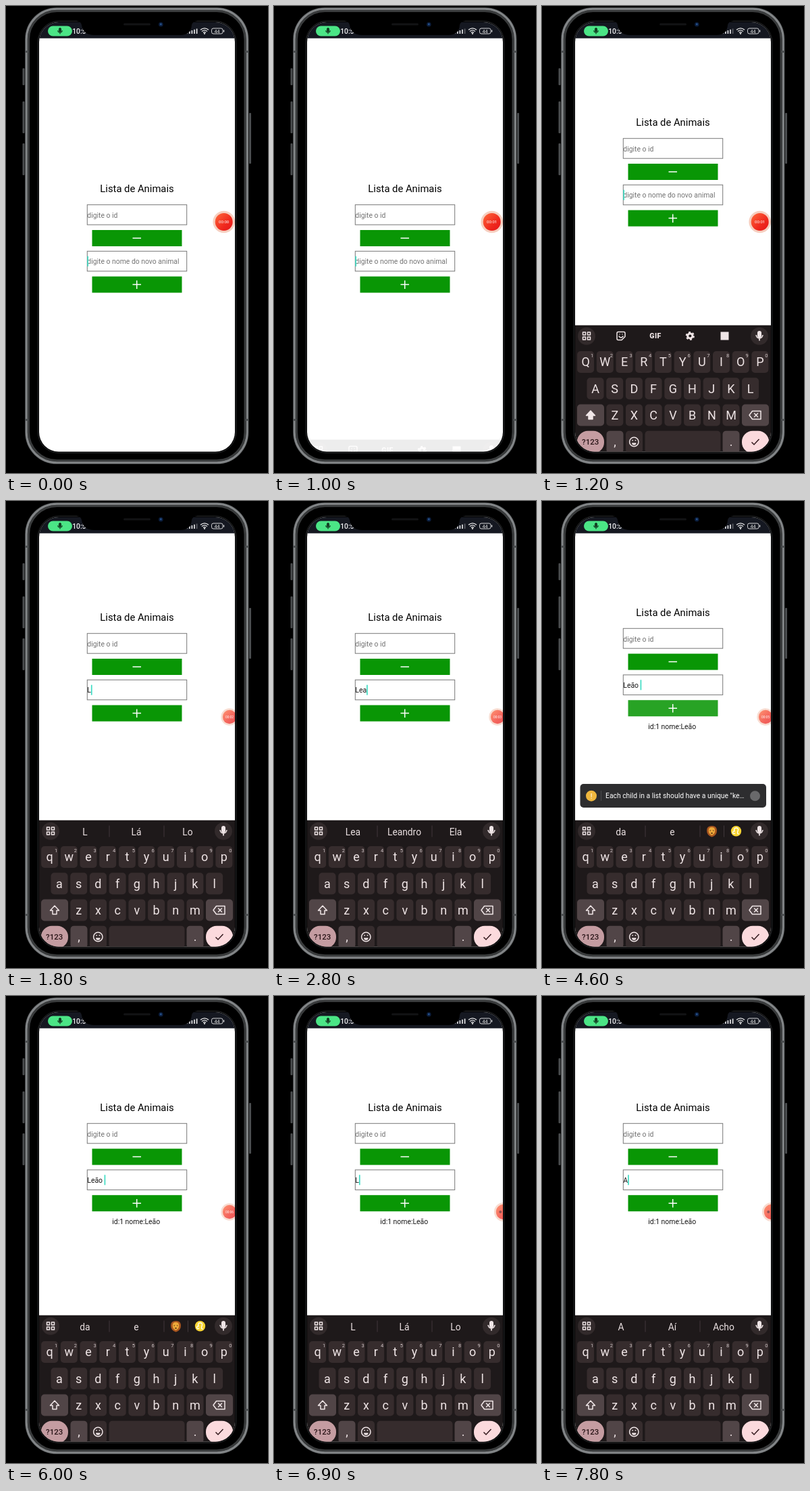
An HTML page for the animation above (8 s loop, 388 px wide and 690 px high).

```html
<!DOCTYPE html>
<html lang="pt">
<head>
<meta charset="utf-8">
<title>Lista de Animais</title>
<style>
  html, body { margin: 0; width: 100%; height: 100%; overflow: hidden; background: #000; }
  svg { display: block; width: 388px; height: 690px; }
  text { font-family: Roboto, sans-serif; white-space: pre; }
  .mid { text-anchor: middle; }
  .hint { font-size: 10.4px; fill: #747474; }
  .body { font-size: 10.4px; fill: #161616; }
  .key { fill: #362c2d; }
  .mod { fill: #514547; }
  .letter { font-size: 18px; fill: #efe5e6; text-anchor: middle; }
  .digit { font-size: 7.5px; fill: #d5cacb; text-anchor: middle; }
  .word { font-size: 13.8px; fill: #eae0e1; text-anchor: middle; }
  .line { fill: none; stroke: #f0e6e7; stroke-width: 1.5; stroke-linecap: round; stroke-linejoin: round; }
</style>
</head>
<body>
<svg viewBox="0 0 388 690">
  <defs>
    <clipPath id="screen"><rect x="49" y="24" width="290" height="634.5" rx="29"/></clipPath>
    <linearGradient id="red" x2="1" y2="1">
      <stop offset="0" stop-color="#ff6a3c"/><stop offset=".6" stop-color="#f02a1e"/><stop offset="1" stop-color="#e3141a"/>
    </linearGradient>
    <g id="mic">
      <rect x="-2" y="-5.5" width="4" height="7.5" rx="2"/>
      <path d="M-4 -1a4 4 0 0 0 8 0M0 3v3" fill="none" stroke-width="1.4"/>
    </g>
  </defs>

  <!-- phone body -->
  <g fill="#4a4d4f">
    <rect x="24.5" y="92" width="3" height="25" rx="1"/>
    <rect x="24.5" y="141" width="3" height="47" rx="1"/>
    <rect x="24.5" y="203" width="3" height="47" rx="1"/>
    <rect x="360" y="158" width="3" height="75" rx="1"/>
  </g>
  <rect x="28" y="2" width="331.500" height="675" rx="47" fill="#303233"/>
  <rect x="30.200" y="4.200" width="327.100" height="670.600" rx="45" fill="none" stroke="#828587" stroke-width="3"/>
  <rect x="33.500" y="7.500" width="320.500" height="664" rx="42" fill="#000" stroke="#393b3c" stroke-width="3"/>
  <path d="M28 67.500h5M28 611.500h5M354.500 67.500h5M354.500 611.500h5" stroke="#4b4e50" stroke-width="3"/>
  <rect x="47.300" y="22.300" width="293.400" height="638" rx="31" fill="none" stroke="#2c2e30"/>

  <g clip-path="url(#screen)">
    <rect x="49" y="24" width="290" height="635" fill="#fff"/>
    <g id="content">
      <text class="mid" x="194" y="275.400" font-size="14.8">Lista de Animais</text>
      <g fill="#fff" stroke="#777" stroke-width="1">
        <rect x="120.300" y="293.700" width="147.400" height="29.500"/>
        <rect x="120.300" y="362.300" width="147.400" height="29.500"/>
      </g>
      <text class="hint" x="120.300" y="313">digite o id</text>
      <text class="hint" id="hint" x="120.300" y="381.200">digite o nome do novo animal</text>
      <text class="body" id="typed" x="120.300" y="381"></text>
      <rect id="caret" y="369.700" width="1.700" height="15" fill="#3fdcc4"/>
      <g fill="#099605">
        <rect x="127.500" y="331" width="133" height="24"/>
        <path d="M187.500 343h12.500" stroke="#fff" stroke-width="1.500"/>
      </g>
      <g id="add" fill="#099605">
        <rect x="127.500" y="399.600" width="133" height="24"/>
        <path d="M187.500 411.600h12.500M193.700 405.400v12.500" stroke="#fff" stroke-width="1.500"/>
      </g>
      <text class="body mid" id="item" x="192.700" y="442.500">id:1 nome:Leão</text>
    </g>

    <g id="toast">
      <rect x="56.500" y="418" width="275.500" height="35" rx="5" fill="#2d2d2f"/>
      <circle cx="73" cy="435.700" r="8" fill="#efb73e"/>
      <text class="mid" x="73" y="439.500" font-size="10.500" fill="#fff">!</text>
      <path d="M87.500 428v15" stroke="#4c4c4e"/>
      <text x="94" y="439.300" font-size="10.350" fill="#fff">Each child in a list should have a unique "ke…</text>
      <circle cx="315.500" cy="435.700" r="7.500" fill="#69696b"/>
    </g>

    <g id="board">
      <rect x="49" y="471.700" width="290" height="190" fill="#1e191a"/>
      <circle cx="66" cy="487.700" r="13" fill="#322a2b"/>
      <circle cx="322" cy="487.700" r="13" fill="#322a2b"/>
      <path class="line" d="M60.500 482h4v4h-4zM67.500 482h4v4h-4zM60.500 489h4v4h-4zM67.500 489h4v4h-4z"/>
      <use href="#mic" transform="translate(322 487.300) scale(1.200)" fill="#f0e6e7" stroke="#f0e6e7"/>
      <g id="tools">
        <path class="line" d="M113 481.500h8q2 0 2 2v5l-5 5h-5q-2 0-2-2v-8q0-2 2-2zM114 488q3 4 6 0M115 485v.1M119 485v.1"/>
        <text class="mid" x="168" y="491.300" font-size="10.500" font-weight="900" fill="#f0e6e7" letter-spacing=".4">GIF</text>
        <circle cx="219.300" cy="487.500" r="3.600" fill="none" stroke="#f0e6e7" stroke-width="3"/>
        <circle cx="219.300" cy="487.500" r="5.600" fill="none" stroke="#f0e6e7" stroke-width="2" stroke-dasharray="2.900 2.964"/>
        <rect x="264.500" y="481.500" width="12" height="12" fill="#eee4e5"/>
      </g>
      <g id="words">
        <path d="M153 479.500v17M234 479.500v17" stroke="#40373a"/>
        <text class="word" x="117" y="493.500"></text>
        <text class="word" x="193" y="493.500"></text>
        <text class="word" x="269" y="493.500"></text>
        <g id="emoji">
          <path d="M269.500 479.500v17" stroke="#40373a"/>
          <path d="M251.500 480q7.500 0 7.500 7t-7.500 9.500q-7.500-2.500-7.500-9.500t7.500-7z" fill="#a8551f"/>
          <path d="M251.500 482q4.800 0 4.800 5t-4.800 7q-4.800-2-4.800-7t4.800-5z" fill="#eda93a"/>
          <path d="M249.300 486.500v1M253.700 486.500v1M250.300 490.700h2.400" stroke="#42210f" stroke-width="1.500"/>
          <circle cx="287.500" cy="487.700" r="7.700" fill="#f8d432"/>
          <path d="M286 490.500a1.800 1.800 0 1 1-1-2.500q-1.500-5 2.500-5t2.700 4q-2 5 1.300 5" fill="none" stroke="#fff" stroke-width="1.300"/>
        </g>
      </g>
      <g id="keys"></g>
      <rect class="mod" x="52" y="588.500" width="40" height="32" rx="5"/>
      <path class="line" id="shift" d="M72 598l-6.500 7h3.500v5.500h6v-5.500h3.500z"/>
      <rect class="mod" x="296" y="588.500" width="40" height="32" rx="5"/>
      <path class="line" d="M311.500 598.500h12.500v12h-12.500l-4.500-6zM314.500 602l5 5M319.500 602l-5 5"/>
      <rect x="52" y="627.700" width="40" height="33" rx="16" fill="#c49ca1"/>
      <text class="mid" x="71.700" y="648.200" font-size="11.500" font-weight="500" fill="#2a1518">?123</text>
      <rect class="mod" x="95.500" y="627.700" width="25" height="33" rx="5"/>
      <text class="letter" x="108" y="650">,</text>
      <rect class="key" x="124" y="627.700" width="25" height="33" rx="5"/>
      <circle class="line" cx="136.300" cy="644" r="6.700"/>
      <path d="M133.100 645.500h6.400a3.200 3.200 0 0 1-6.400 0zM133.300 641h1.600v1.600h-1.600zM137.700 641h1.600v1.600h-1.600z" fill="#f0e6e7"/>
      <rect class="key" x="152.500" y="627.700" width="112" height="33" rx="5"/>
      <rect class="mod" x="267.500" y="627.700" width="25" height="33" rx="5"/>
      <text class="letter" x="280" y="650">.</text>
      <rect x="296" y="627.700" width="40" height="33" rx="16" fill="#fbdadd"/>
      <path d="M310.500 644.500l3.500 3.500 7.500-8" fill="none" stroke="#33191d" stroke-width="1.500"/>
      <g id="pop">
        <rect x="-13" y="-18" width="26" height="36" rx="6" fill="#5c4f51"/>
        <text class="letter" y="6"></text>
      </g>
    </g>

    <g id="rec">
      <circle r="16.300" fill="#f6cfc0"/>
      <circle r="13" fill="url(#red)"/>
      <text class="mid" id="clock" y="2.200" font-size="6.100" fill="#fff"></text>
      <circle id="dot" cx="-5.500" r="2.400" fill="#6b0d10"/>
    </g>

    <!-- status bar -->
    <rect x="49" y="24" width="290" height="23.700" fill="#151821"/>
    <rect x="62" y="29.500" width="36" height="15" rx="7.500" fill="#4be586"/>
    <use href="#mic" transform="translate(80 36.800) scale(.8)" fill="#123c22" stroke="#123c22"/>
    <text x="98.200" y="40.700" font-size="10.300" font-weight="500" fill="#f4f4f6">10:51</text>
    <path d="M268.200 41v-2.500M271.800 41v-3.700M275.400 41v-5M279 41v-6.200" stroke="#e4e4e6" stroke-width="1.700"/>
    <path id="bar" d="M282.600 41v-7.500" stroke="#e4e4e6" stroke-width="1.700"/>
    <path d="M288 35.300q6-5 12 0M290 37.500q4-3.300 8 0M292 39.500q2-1.600 4 0" fill="none" stroke="#eee" stroke-width="1.300"/>
    <circle cx="294" cy="40.800" r="1.100" fill="#eee"/>
    <rect x="304.500" y="33" width="16.500" height="8" rx="2.500" fill="none" stroke="#d8d8da"/>
    <path d="M322.600 35.500v3" stroke="#d8d8da" stroke-width="1.300"/>
    <text class="mid" x="312.500" y="39.600" font-size="7" fill="#eee">44</text>
  </g>

  <!-- notch -->
  <path d="M105 20h178v2q-7 1-8 6q-1 15-17 15H131q-17 0-19-15q-1-5-7-6z" fill="#000"/>
  <rect x="174" y="25.500" width="40" height="3" rx="1.500" fill="#121315"/>
  <circle cx="229.300" cy="27.300" r="3.300" fill="#0b1d3c"/>
  <circle cx="229.300" cy="27" r="1.400" fill="#28548f"/>
</svg>
<script>
const LOOP = 8000, STEP = 100;
const $ = id => document.getElementById(id);
const show = (id, on) => { $(id).style.display = on ? '' : 'none'; };
const move = (id, x, y, s = 1) => $(id).setAttribute('transform', `translate(${x} ${y}) scale(${s})`);

// [time, field text, suggestions]
const edits = [
  [0, '', ''],
  [1800, 'L', 'L Lá Lo'],
  [2300, 'Le', 'Le Lê Leve'],
  [2700, 'Lea', 'Lea Leandro Ela'],
  [3000, 'Leao', 'Leao Leão Leo'],
  [3600, 'Leão ', 'da e'],
  [6600, 'Leão', 'Leão Leões Leo'],
  [6700, 'Leã', 'Leã Leão Lea'],
  [6800, 'Le', 'Le Lê Leve'],
  [6900, 'L', 'L Lá Lo'],
  [7100, '', ''],
  [7700, 'A', 'A Aí Acho']
];

// [time, letter, x, y] of the key bubbles, each held for one step
const taps = [[1700, 'L', 308, 527], [2200, 'e', 122, 489], [2600, 'a', 79, 526], [2900, 'o', 294, 489]];

const rows = [['qwertyuiop', 64.6, 510], ['asdfghjkl', 79, 549.3], ['zxcvbnm', 107.8, 588.5]];
$('keys').innerHTML = rows.map(([letters, x0, y], r) => [...letters].map((c, i) => {
  const x = x0 + i * 28.7;
  const digit = r ? '' : `<text class="digit" x="${x + 9.5}" y="${y + 8.5}">${(i + 1) % 10}</text>`;
  return `<rect class="key" x="${x - 12.5}" y="${y}" width="25" height="32" rx="5"/>
    <text class="letter" data-c="${c}" x="${x}" y="${y + 22.2}"></text>${digit}`;
}).join('')).join('');

const letters = [...document.querySelectorAll('[data-c]')];
const words = [...document.querySelectorAll('.word')];

function drawField(t) {
  const [since, text, hints] = edits.filter(e => e[0] <= t).pop();
  $('typed').textContent = text;
  show('hint', !text);
  $('caret').setAttribute('x', 120.3 + (text ? $('typed').getComputedTextLength() : 0));
  show('caret', Math.floor((t - since) / 500) % 2 === 0);

  const list = hints.split(' ');
  show('tools', !hints);
  show('words', hints);
  words.forEach((w, i) => { w.textContent = list[i] || ''; });
  show('emoji', list.length === 2);

  letters.forEach(el => { el.textContent = text ? el.dataset.c : el.dataset.c.toUpperCase(); });
  $('shift').style.fill = text ? 'none' : '#f0e6e7';
}

function drawBoard(t) {
  const p = Math.min(Math.max((t - 1000) / 200, 0), 1);
  show('board', t >= 1000);
  move('board', 0, 169 * (1 - p) ** 2);
  $('board').style.opacity = 0.08 + 0.92 * Math.min(p * 1.7, 1);

  const tap = taps.find(k => t >= k[0] && t < k[0] + STEP);
  show('pop', tap);
  if (tap) {
    $('pop').lastElementChild.textContent = tap[1];
    move('pop', tap[2], tap[3]);
  }
}

function drawRecorder(t) {
  const tucked = t >= 6700;
  const small = t >= 1700;
  $('clock').textContent = '00:0' + Math.floor((t + 400) / 1000);
  show('clock', !tucked);
  show('dot', tucked);
  if (tucked) move('rec', 340, 319, 0.86);
  else if (small) move('rec', 331, 319, 0.78);
  else move('rec', 322.7, 319);
  $('rec').style.opacity = small ? 0.72 : 1;
}

function draw(t) {
  const added = t >= 4500;
  move('content', 0, t < 1100 ? 0 : added ? -105.4 : -98);
  show('item', added);
  show('toast', added && t < 5200);
  $('add').style.opacity = t < 4400 || t >= 4800 ? 1 : [0.2, 0.55, 0.87, 0.97][(t - 4400) / STEP];
  $('bar').style.opacity = t < 700 || t >= 5300 ? 1 : 0.35;
  drawField(t);
  drawBoard(t);
  drawRecorder(t);
}

let last = -1;
function frame() {
  const t = Math.floor(performance.now() % LOOP / STEP) * STEP;
  if (t !== last) draw(last = t);
  requestAnimationFrame(frame);
}
frame();
</script>
</body>
</html>
```
